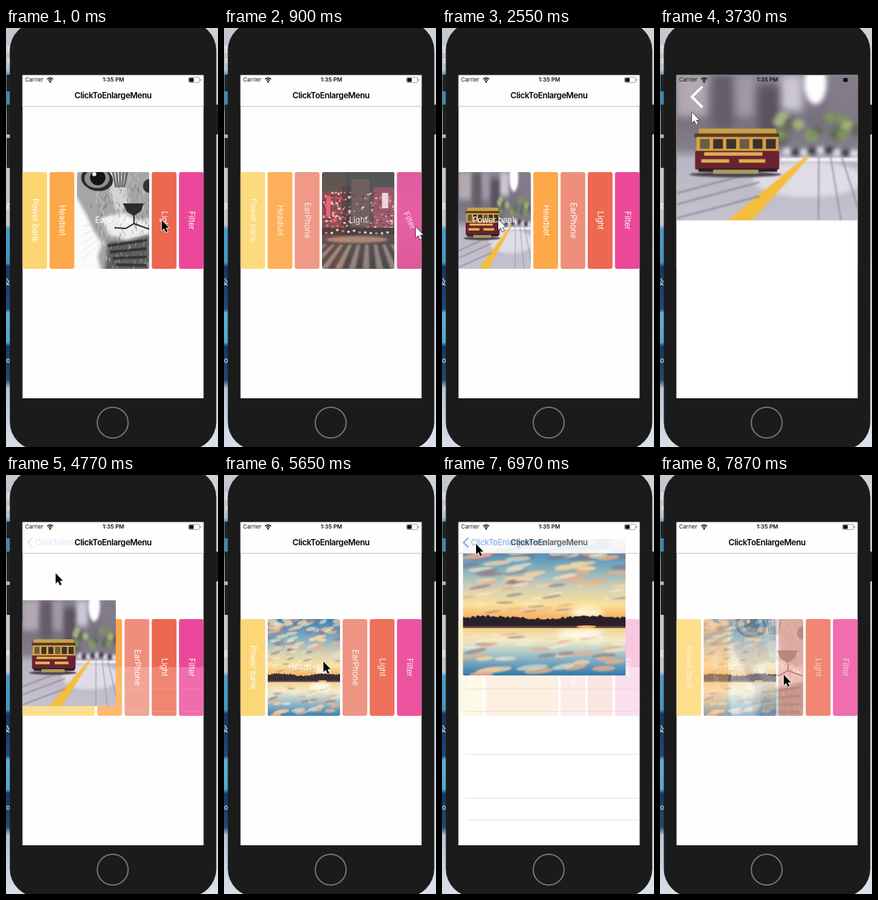
An HTML page with a canvas that plays this animation: 305 px wide and 602 px high, repeating every 8000 ms.

```html
<!DOCTYPE html>
<html lang="en">
<head>
<meta charset="utf-8">
<title>ClickToEnlargeMenu</title>
<style>
html, body { margin: 0; width: 100%; height: 100%; overflow: hidden; background: #1b1b1b; }
canvas { display: block; width: 305px; height: 602px; }
</style>
</head>
<body>
<canvas id="stage" width="305" height="602"></canvas>
<script>
const LOOP = 8000;
const FONT = 'Inter, "Open Sans", sans-serif';
const ctx = document.getElementById('stage').getContext('2d');

const clamp = v => Math.max(0, Math.min(1, v));
const smooth = v => { v = clamp(v); return v * v * (3 - 2 * v); };
const mix = (a, b, p) => a + (b - a) * p;

function seeded(seed) {
  return () => (seed = (seed * 16807) % 2147483647) / 2147483647;
}

// ---------- drawing helpers ----------
function box(c, color, x, y, w, h, r = 0) {
  c.fillStyle = color;
  c.beginPath();
  c.roundRect(x, y, w, h, r);
  c.fill();
}

function poly(c, color, ...p) {
  c.fillStyle = color;
  c.beginPath();
  for (let i = 0; i < p.length; i += 2) c.lineTo(p[i], p[i + 1]);
  c.fill();
}

function oval(c, color, x, y, rx, ry = rx, turn = 0) {
  c.fillStyle = color;
  c.beginPath();
  c.ellipse(x, y, rx, ry, turn, 0, 7);
  c.fill();
}

function line(c, color, width, ...p) {
  c.strokeStyle = color;
  c.lineWidth = width;
  c.beginPath();
  for (let i = 0; i < p.length; i += 2) c.lineTo(p[i], p[i + 1]);
  c.stroke();
}

function fade(c, h, ...stops) {
  const g = c.createLinearGradient(0, 0, 0, h);
  for (let i = 0; i < stops.length; i += 2) g.addColorStop(stops[i], stops[i + 1]);
  return g;
}

function text(str, x, y, size, color, { weight = 400, align = 'center', spacing = 0 } = {}) {
  ctx.font = `${weight} ${size}px ${FONT}`;
  ctx.letterSpacing = spacing + 'px';
  ctx.textAlign = align;
  ctx.textBaseline = 'middle';
  ctx.fillStyle = color;
  ctx.fillText(str, x, y);
}

function withAlpha(a, draw) {
  ctx.save();
  ctx.globalAlpha *= clamp(a);
  draw();
  ctx.restore();
}

// ---------- pictures ----------
function picture(w, h, paint) {
  const canvas = document.createElement('canvas');
  canvas.width = w;
  canvas.height = h;
  paint(canvas.getContext('2d'), w, h, seeded(w * 7 + h));
  return canvas;
}

const tram = picture(261, 209, (c, w, h, rnd) => {
  box(c, fade(c, h, 0, '#8d8593', .3, '#77717f', .5, '#857f8b', .58, '#b9b5c3', 1, '#c6c2ce'), 0, 0, w, h);
  c.filter = 'blur(6px)';
  box(c, '#b3a9b1', 0, 0, 45, 60);
  box(c, '#655d69', 52, 0, 30, 78);
  box(c, '#a198a8', 86, 0, 26, 60);
  box(c, '#5c5260', 118, 15, 40, 85);
  box(c, '#cbc6d4', 150, 0, 32, 52);
  box(c, '#837a8a', 222, 0, 40, 66);
  c.filter = 'blur(3px)';
  oval(c, '#fff', 200, 12, 16, 30);
  for (let i = 0; i < 16; i++) {
    oval(c, ['#7f9460', '#a5b37f', '#5c6854'][i % 3], 148 + rnd() * 115, 58 + rnd() * 34, 9, 8);
  }
  for (let i = 0; i < 9; i++) oval(c, i % 2 ? '#2f2c3a' : '#eceaf2', 160 + i * 12, 108 + rnd() * 5, 7, 5);
  oval(c, '#dfdce6', 190, 150, 80, 26);
  c.filter = 'blur(1px)';
  box(c, '#f4f3f7', 150, 119, 111, 5);
  poly(c, '#f5bd3b', 185, 118, 191, 118, 109, 209, 74, 209);
  for (const x of [205, 222, 238]) line(c, '#85818f', 1.5, x, 118, x * 1.9 - 185, 209);
  for (const y of [160, 176, 196]) line(c, '#8a8593', 2, 0, y + 10, 120, y - 22);
  oval(c, '#4d4650', 85, 143, 66, 4);
  c.filter = 'none';
  box(c, '#c8a04b', 32, 77, 112, 8, 3);
  box(c, '#5b3a26', 26, 84, 122, 6, 2);
  box(c, '#d6a341', 29, 89, 118, 22);
  for (let i = 0; i < 6; i++) box(c, i % 3 ? '#3a3130' : '#6b5a45', 34 + i * 19, 92, 14, 14);
  box(c, '#6a2230', 27, 109, 121, 27, 2);
  box(c, '#dcb050', 40, 111, 84, 5);
  box(c, '#dcb050', 36, 121, 40, 5);
  box(c, '#dcb050', 90, 121, 38, 5);
  box(c, '#2c2024', 32, 134, 113, 5);
  box(c, '#a89a60', 53, 136, 65, 6);
});

const sunset = picture(261, 209, (c, w, h, rnd) => {
  box(c, fade(c, h, 0, '#2d77ad', .18, '#6fa5bf', .34, '#c9cdb9', .48, '#fbe29a', .57, '#f6b566',
    .65, '#f3cf8c', .74, '#f4ecc9', .85, '#9fc0c8', 1, '#2f78ad'), 0, 0, w, h);
  const clouds = (flip, count) => {
    for (let i = 0; i < count; i++) {
      const d = rnd();
      const y = flip ? 140 + d * 68 : 112 - d * 112;
      const tone = ['#f6d3a0cc', '#e9b08fcc', '#fdeecb99', '#87748399'][Math.floor(rnd() * 4)];
      oval(c, tone, rnd() * w, y, 7 + d * 17 * rnd() + 6, 1.2 + d * 3.6, -.2 * rnd());
    }
  };
  c.filter = 'blur(1px)';
  clouds(false, 110);
  clouds(true, 45);
  c.filter = 'blur(4px)';
  oval(c, '#fff6cf', 198, 112, 26, 9);
  oval(c, '#fffbe6', 190, 146, 40, 8);
  c.filter = 'none';
  box(c, '#2a2029', 0, 123, w, 11);
  for (let x = 0; x < w; x += 4) oval(c, '#2a2029', x, 124 - 2 * Math.sin(x / 27), 4, 2 + rnd() * 4);
  box(c, '#5a3f3c', 0, 133, w, 3);
  oval(c, '#ffb45a', 198, 134, 16, 2);
});

const cat = picture(104, 139, (c, w, h, rnd) => {
  box(c, '#fbfbfb', 0, 0, w, h);
  c.filter = 'blur(2px)';
  poly(c, '#a5a5a5', 0, -5, 110, -5, 110, 145, 36, 145, 30, 122, 36, 102, 24, 84, 14, 62, 2, 40, -4, 28);
  poly(c, '#d2d2d2', 42, 0, 68, 0, 74, 45, 60, 62, 48, 34);
  poly(c, '#eeeeee', 34, 66, 68, 58, 88, 70, 104, 66, 104, 90, 70, 98, 46, 90);
  poly(c, '#5f5f5f', 45, 100, 74, 99, 104, 90, 104, 145, 40, 145);
  c.filter = 'none';
  for (let i = 0; i < 260; i++) {
    const y = rnd() * h, x = 8 + y * .26 + rnd() * 92;
    line(c, rnd() < .5 ? '#33333366' : '#ffffff77', .9, x, y, x + 3 - rnd() * 6, y + 6);
  }
  for (let i = 0; i < 5; i++) line(c, '#333a', 2.5, 52 + i * 5, 0, 56 + i * 3, 22);
  for (let i = 0; i < 4; i++) line(c, '#222a', 4, 44 + i * 4, 106 + i * 9, 100, 98 + i * 12);
  oval(c, '#2b2b2b', 29, 10, 23, 17, .2);
  oval(c, '#8f8f8f', 29, 9, 18, 14);
  oval(c, '#151515', 30, 8, 11, 11);
  oval(c, '#eee', 25, 3, 3);
  oval(c, '#333', 104, 20, 9, 10);
  poly(c, '#2c2c2c', 66, 45, 96, 45, 92, 56, 82, 63, 72, 57);
  line(c, '#2b2b2b', 2, 82, 62, 82, 74, 70, 81, 54, 80);
  line(c, '#2b2b2b', 2, 82, 74, 104, 82);
  for (let i = 0; i < 5; i++) line(c, '#bbb8', .7, 60, 66 + i * 3, 8, 78 + i * 12);
});

const city = picture(104, 139, (c, w, h, rnd) => {
  box(c, fade(c, h, 0, '#3a3f3b', .3, '#40413f', .6, '#4d3b3a', .7, '#44383a', 1, '#3a332f'), 0, 0, w, h);
  box(c, '#6e3540', 0, 28, 28, 56);
  box(c, '#3a2d31', 28, 20, 14, 62);
  box(c, '#5c4a48', 42, 10, 26, 68);
  box(c, '#8b4353', 74, 22, 30, 66);
  for (let i = 0; i < 230; i++) {
    const side = rnd();
    const x = side < .4 ? rnd() * 32 : side < .75 ? 70 + rnd() * 34 : 30 + rnd() * 42;
    const tones = ['#e65873', '#f4d8cf', '#d63b4f', '#ffb9a4', '#2e2528'];
    box(c, tones[Math.floor(rnd() * 5)], x, 28 + rnd() * 54, 1 + rnd() * 3, 1 + rnd() * 2.5);
  }
  box(c, '#f6dce2', 86, 30, 9, 22);
  box(c, '#e8506c', 6, 34, 6, 30);
  box(c, '#292427', 0, 80, w, 10);
  for (let i = 0; i < 12; i++) oval(c, i % 3 ? '#fff0d0' : '#ff6b55', 6 + i * 8, 83 + rnd() * 5, 1.8);
  c.filter = 'blur(1px)';
  oval(c, '#a07b66', 50, 97, 44, 5);
  for (let i = 0; i < 9; i++) {
    poly(c, '#a79a8dbb', 2 + i * 12, 104, 7 + i * 12, 104, i * 20 - 32, 139, i * 20 - 42, 139);
  }
  c.filter = 'none';
});

const dusk = picture(104, 139, (c, w, h) => {
  box(c, fade(c, h, 0, '#6d6c86', .5, '#b48ba0', 1, '#55495c'), 0, 0, w, h);
});

// ---------- phone ----------
const ITEMS = [
  { name: 'Power bank', color: '#fcd670', image: tram },
  { name: 'Headset', color: '#fda849', image: sunset },
  { name: 'EarPhone', color: '#ee8f7c', image: cat },
  { name: 'Light', color: '#ec6850', image: city },
  { name: 'Filter', color: '#ec489a', image: dusk },
];
const SCREEN = { x: 23.5, y: 67.5, w: 261, h: 464.5 };
const TOP = 207, HEIGHT = 139, NARROW = 35.6, WIDE = 104.3, PITCH = 39.17;

const cellX = (i, open) => SCREEN.x + i * PITCH + (i > open ? WIDE - NARROW : 0);

function drawDesktop() {
  box(ctx, fade(ctx, 602, 0, '#c5c9cf', .1, '#b9c0c8', .115, '#3f87a8', .19, '#4c86a0', .2, '#a9adb2',
    .34, '#c9c6c4', .47, '#c3c6ca', .48, '#4b9cc6', .56, '#4a93bd', .57, '#17375f', .67, '#1f4b7c',
    .68, '#63aed2', .75, '#5aa5cc', .76, '#123a66', .84, '#234a70', .86, '#b9c5d4', 1, '#d8dee8'), 0, 0, 30, 602);
  box(ctx, fade(ctx, 602, 0, '#cfd3d9', .5, '#c4c8cd', 1, '#dbe1ea'), 275, 0, 30, 602);
  for (const [str, y] of [['且', 30], ['s', 46], ['g', 254], ['及', 365], ['o', 477]]) {
    ctx.font = '10px "Noto Sans CJK SC", "Noto Sans CJK", sans-serif';
    ctx.textAlign = 'right';
    ctx.textBaseline = 'middle';
    ctx.fillStyle = '#fff';
    ctx.fillText(str, 6, y);
  }
  for (const [y, h] of [[67, 24], [110, 43], [158, 43]]) box(ctx, '#222', 1, y, 8, h, 1);
  box(ctx, '#222', 300, 110, 5, 43, 1);
  box(ctx, '#1b1b1b', 5.5, -8, 297, 614, 40);
  ctx.strokeStyle = '#777';
  ctx.lineWidth = 1.8;
  ctx.beginPath();
  ctx.arc(153.5, 567, 22.2, 0, 7);
  ctx.stroke();
}

function drawStatus() {
  text('Carrier', 27.5, 75, 8, '#111', { align: 'left' });
  text('1:35 PM', 154.5, 75, 8.2, '#111', { weight: 600 });
  ctx.strokeStyle = '#111';
  ctx.lineWidth = 1.4;
  for (const r of [3.5, 6.2]) {
    ctx.beginPath();
    ctx.arc(63.5, 78, r, -2.35, -.79);
    ctx.stroke();
  }
  oval(ctx, '#111', 63.5, 77.3, 1.3);
  ctx.strokeStyle = '#888';
  ctx.lineWidth = .8;
  ctx.beginPath();
  ctx.roundRect(262.5, 70.8, 16, 7.6, 2);
  ctx.stroke();
  box(ctx, '#111', 263.5, 71.8, 6.5, 5.6, 1);
  box(ctx, '#888', 279.4, 73.2, 1.1, 2.8);
}

function drawPicture(image, x, y, w, h, r) {
  ctx.save();
  ctx.beginPath();
  ctx.roundRect(x, y, w, h, r);
  ctx.clip();
  ctx.drawImage(image, x, y, w, h);
  ctx.restore();
}

function drawCells(open, { tapped = -1, turn = 0, hidePicture = false } = {}) {
  ITEMS.forEach((item, i) => {
    const x = cellX(i, open), isOpen = i === open, w = isOpen ? WIDE : NARROW;
    if (isOpen && !hidePicture) drawPicture(item.image, x, TOP, w, HEIGHT, 3);
    else box(ctx, item.color, x, TOP, w, HEIGHT, 3);
    if (isOpen && hidePicture) return;
    ctx.save();
    ctx.translate(x + w / 2, TOP + HEIGHT / 2);
    if (!isOpen) ctx.rotate(Math.PI / 2 * (i === tapped ? 1 - turn : 1));
    text(item.name, 0, 0, 11.3, '#fff');
    ctx.restore();
  });
}

function drawNavBar(shown) {
  withAlpha(shown * 5.2, () => {
    box(ctx, '#fefefe', SCREEN.x, SCREEN.y, SCREEN.w, 45);
    box(ctx, '#c4c4c4', SCREEN.x, 112, SCREEN.w, 1);
  });
  withAlpha(clamp(shown * 5) * (1 - shown) * .8, () => {
    line(ctx, '#1a7ff5', 2, 38, 90, 31, 97, 38, 104);
    text('ClickToEnlargeMenu', 41.5, 97, 11.8, '#1a7ff5', { align: 'left', spacing: -.3 });
  });
  withAlpha(shown * 3.5, () =>
    text('ClickToEnlargeMenu', 154, 97, 11.8, '#000', { weight: 600, spacing: -.35 }));
}

// shown: 1 is the menu, 0 the detail page
function drawDetail(open, shown) {
  const split = 276;
  withAlpha(1 - shown * 1.8, () => box(ctx, '#fff', SCREEN.x, SCREEN.y, SCREEN.w, split - SCREEN.y));
  withAlpha(1 - shown, () => {
    box(ctx, '#fff', SCREEN.x, split, SCREEN.w, 532 - split);
    if (shown > 0) for (const y of [307, 339, 401, 464, 495]) box(ctx, '#dcdcdc', 34, y, 250.5, 1);
  });
  drawPicture(ITEMS[open].image,
    mix(SCREEN.x, cellX(open, open), shown), mix(SCREEN.y, TOP, shown),
    mix(SCREEN.w, WIDE, shown), mix(209, HEIGHT, shown), Math.min(3, shown * 20));
  withAlpha(1 - shown * 8, () => line(ctx, '#fff', 3.4, 61, 84, 46, 99, 61, 114));
}

function drawCursor([x, y], light) {
  ctx.save();
  ctx.translate(x, y);
  ctx.lineJoin = 'round';
  ctx.lineWidth = light ? 1.2 : 1.6;
  ctx.strokeStyle = light ? '#222' : '#fff';
  ctx.fillStyle = light ? '#fff' : '#000';
  ctx.beginPath();
  for (const [px, py] of [[0, 0], [0, 15], [3.5, 12], [6, 17.5], [8.5, 16.5], [6, 11], [10.5, 11]]) ctx.lineTo(px, py);
  ctx.closePath();
  ctx.stroke();
  ctx.fill();
  ctx.restore();
}

// ---------- timeline ----------
// start, end and number of pictures of each burst of motion
const BURSTS = [[0, 0, 1], [150, 600, 4], [900, 1650, 6], [1950, 2550, 5], [2840, 3730, 7],
  [4180, 5060, 7], [5360, 6390, 8], [6530, 7570, 8], [7720, 7870, 2]];
const TAPS = [[-1000, 2], [90, 3], [830, 4], [1910, 0], [5360, 1], [7744, 2]];
const VISITS = [[2790, 4480], [5950, 6870]];
const CURSOR = [[0, 224, 276], [300, 224, 276], [600, 276, 286], [1050, 276, 286], [1650, 72, 279],
  [2250, 72, 279], [2550, 81, 275], [3130, 81, 275], [3730, 46, 121], [4180, 46, 121], [4400, 49, 101],
  [4630, 49, 101], [5060, 143, 268], [6080, 143, 268], [6390, 88, 178], [6530, 88, 178],
  [6680, 49, 99], [6980, 49, 99], [7570, 178, 287]];

function steppedTime(t) {
  const [start, end, count] = BURSTS.findLast(b => b[0] <= t);
  if (count === 1) return start;
  const step = (end - start) / (count - 1);
  return start + step * Math.min(count - 1, Math.floor((t - start + 10) / step));
}

function cursorAt(t) {
  const next = CURSOR.findIndex(k => k[0] > t);
  if (next < 0) return CURSOR.at(-1).slice(1);
  const a = CURSOR[next - 1], b = CURSOR[next];
  const p = smooth((t - a[0]) / (b[0] - a[0]));
  return [mix(a[1], b[1], p), mix(a[2], b[2], p)];
}

function render(t) {
  const tap = TAPS.findLastIndex(k => k[0] <= t);
  const [start, open] = TAPS[tap];
  const swap = smooth((t - start) / 350);
  const shown = VISITS.reduce((s, [go, back]) => s - smooth((t - go) / 400) + smooth((t - back) / 400), 1);

  drawDesktop();
  ctx.save();
  ctx.beginPath();
  ctx.rect(SCREEN.x, SCREEN.y, SCREEN.w, SCREEN.h);
  ctx.clip();
  box(ctx, '#fefefe', SCREEN.x, SCREEN.y, SCREEN.w, SCREEN.h);
  if (swap < 1) {
    const turn = smooth((t - start) / 200);
    withAlpha(1 - swap, () => drawCells(TAPS[tap - 1][1], { tapped: open, turn }));
  }
  withAlpha(swap, () => drawCells(open, { hidePicture: shown < 1 }));
  if (shown < 1) drawDetail(open, shown);
  drawNavBar(shown);
  drawStatus();
  ctx.restore();
  drawCursor(cursorAt(t), t >= 900 && t < 4180);
}

function tick(now) {
  render(steppedTime(now % LOOP));
  requestAnimationFrame(tick);
}
tick(performance.now());
</script>
</body>
</html>
```
